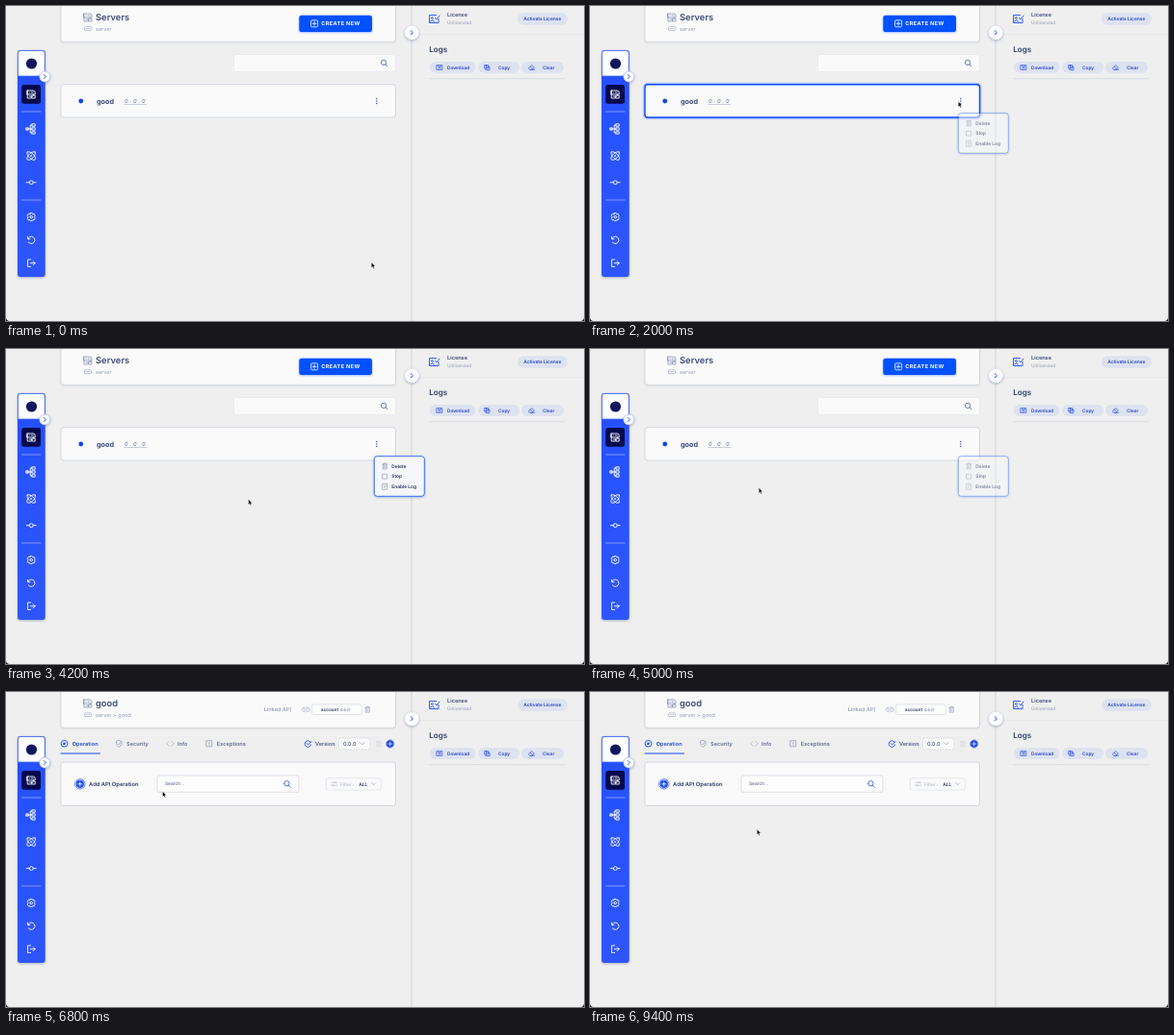
An HTML page for the animation above (9.8 s loop, 600 by 328 pixels).

```html
<!DOCTYPE html>
<html lang="en">
<head>
<meta charset="utf-8">
<title>Servers</title>
<style>
html, body { margin: 0; width: 100%; height: 100%; overflow: hidden; background: #efefef; }
svg { display: block; width: 600px; height: 328px; }
text { font-family: Inter, sans-serif; font-weight: 600; text-rendering: geometricPrecision; white-space: pre; }
.line { fill: none; stroke-linecap: round; stroke-linejoin: round; }
</style>
</head>
<body>
<svg id="stage" viewBox="0 0 600 328" xmlns="http://www.w3.org/2000/svg">
  <defs>
    <filter id="soft" x="-30%" y="-30%" width="160%" height="180%">
      <feDropShadow dx="0" dy="1" stdDeviation="1.2" flood-color="#30437c" flood-opacity=".4"/>
    </filter>
    <filter id="glow" x="-20%" y="-20%" width="140%" height="150%">
      <feDropShadow dx="0" dy=".6" stdDeviation="1.3" flood-color="#2b5cff" flood-opacity=".5"/>
    </filter>
    <linearGradient id="side" x2="0" y2="1">
      <stop stop-color="#2450ff"/><stop offset="1" stop-color="#2f55fa"/>
    </linearGradient>
  </defs>
</svg>
<script>
const LOOP = 9800, STEP = 100;
const BLUE = '#0a4dff', INK = '#3f4b78', MUTED = '#9299b5', PALE = '#b3b9cc', EDGE = '#d0d4dd', CARD = '#fafafa';
const stage = document.getElementById('stage');

const rect = (x, y, w, h, r, fill, stroke = 'none', sw = .8, more = '') =>
  `<rect x="${x}" y="${y}" width="${w}" height="${h}" rx="${r}" fill="${fill}" stroke="${stroke}" stroke-width="${sw}" ${more}/>`;
const circle = (x, y, r, fill, stroke = 'none', sw = .8, more = '') =>
  `<circle cx="${x}" cy="${y}" r="${r}" fill="${fill}" stroke="${stroke}" stroke-width="${sw}" ${more}/>`;
const path = (d, color, sw = .8, x = 0, y = 0) =>
  `<path class="line" d="${d}" stroke="${color}" stroke-width="${sw}" transform="translate(${x} ${y})"/>`;
const text = (s, x, y, size, fill, weight = 600, more = '') =>
  `<text x="${x}" y="${y}" font-size="${size}" fill="${fill}" style="font-weight:${weight}" ${more}>${s}</text>`;

// Icons are drawn around their own centre.
const ICON = {
  server: 'M-4-4H2Q4-4 4-2V0H-4ZM-4 0V4H0M-4-4V0M-2-2H-1.8M0-2H2M-2 2H-.5M1 1H4V4H1ZM2.5 0V1M0 2.5H1',
  tree: 'M-5 0H1M-1 0V-4H1M-1 0V4H1M1-5.2H4V-2.8H1ZM1-1.2H4V1.2H1ZM1 2.8H4V5.2H1ZM-5-1.2H-3V1.2H-5Z',
  atom: 'M-4-4C-1-6 6 1 4 4C1 6-6-1-4-4ZM4-4C1-6-6 1-4 4C-1 6 6-1 4-4ZM-.5 0A.5.5 0 1 0 .5 0A.5.5 0 1 0-.5 0',
  commit: 'M-5 0H-2M2 0H5M-2 0A2 2 0 1 0 2 0A2 2 0 1 0-2 0',
  gear: 'M-1-4H1L1.5-2.9L3-3.2L4-1.5L3.3 0L4 1.5L3 3.2L1.5 2.9L1 4H-1L-1.5 2.9L-3 3.2L-4 1.5L-3.3 0L-4-1.5L-3-3.2L-1.5-2.9ZM-1.3 0A1.3 1.3 0 1 0 1.3 0A1.3 1.3 0 1 0-1.3 0',
  undo: 'M-3.7-3.5V-1H-1.2M-3.5-1.2A3.7 3.7 0 1 1-3 2.2',
  exit: 'M-.5-3.7H-3.7V3.7H-.5M-1 0H4M2-2L4 0L2 2',
  link: 'M-.7-2H-1.8A2 2 0 0 0-1.8 2H-.7M.7-2H1.8A2 2 0 0 1 1.8 2H.7M-1.7 0H1.7',
  find: 'M-3.3-.6A2.7 2.7 0 1 0 2.1-.6A2.7 2.7 0 1 0-3.3-.6M1.4 1.4L3.4 3.4',
  trash: 'M-2.5-2H2.5M-1-2V-3H1V-2M-2-2V3H2V-2M-.7-.5V1.7M.7-.5V1.7',
  stop: 'M-2.4-2.4H2.4V2.4H-2.4Z',
  log: 'M-2.3-3H2.3V3H-2.3ZM-1-1H1M-1 .7H.5',
  plus: 'M-2 0H2M0-2V2',
  down: 'M-1.8-.9L0 .9L1.8-.9',
  next: 'M-1-2L1 0L-1 2',
  shield: 'M0-3.4L2.8-2.3V0Q2.5 2.3 0 3.5Q-2.5 2.3-2.8 0V-2.3ZM-1.2 0L-.2 1L1.4-1',
  code: 'M-1.5-2.4L-3.8 0L-1.5 2.4M1.5-2.4L3.8 0L1.5 2.4',
  warn: 'M-2.8-3H2.8V3H-2.8ZM0-1.4V.5M0 1.6V1.7',
  check: 'M2.8-1.7A3.3 3.3 0 1 0 3.2.8M-1.3-.4L0 1L3.5-2.5',
  slide: 'M-3-1.5H0M2-1.5H3M0-1.5A1 1 0 1 0 2-1.5A1 1 0 1 0 0-1.5M-3 1.5H-2M0 1.5H3M-2 1.5A1 1 0 1 0 0 1.5A1 1 0 1 0-2 1.5',
  save: 'M-2.8-2.3H2.8V2.3H-2.8ZM-1.2-2.3V-.5H1.2V-2.3M-1.2 1H1.2',
  copy: 'M-2.5-2.5H1.2V1H-2.5ZM-1-2.5V-.8H2.5V2.6H-1Z',
  erase: 'M-3 .7L.3-2.4L3 .2L.7 2.3H-1.4ZM-1.3-.9L1.5 1.7M-1 2.3H3',
  badge: 'M2-4H-5V4H4.5V0M-3-1A1 1 0 1 0-1-1A1 1 0 1 0-3-1M-4 2.5Q-2 0 0 2.5M1-1L2.5.5L5.5-3.5'
};
const icon = (name, x, y, color, sw = .7) => path(ICON[name], color, sw, x, y);
const box = (y, h) => rect(57, y, 347.5, h, 3, CARD, EDGE, .9);

function header(title, trail) {
  return rect(57, -6, 347.5, 43.3, 3, CARD, EDGE, .9, 'filter="drop-shadow(0 1px 1px #0001)"') +
    icon('server', 85, 12, '#7f89ab', .7) + text(title, 93, 15.3, 9.4, INK, 600) +
    icon('link', 85, 23.7, MUTED, .6) + text(trail, 93, 25.8, 5.5, MUTED, 400);
}

function sidebar() {
  const items = { tree: 128, atom: 156, commit: 183.7, gear: 219.7, undo: 243.7, exit: 267.7 };
  return rect(12, 46, 28.7, 236, 3, 'url(#side)', 'none', 0, 'filter="url(#soft)"') +
    `<path d="M12.4 73V49Q12.4 46.4 15 46.4H37.7Q40.3 46.4 40.3 49V73Z" fill="#fdfdff" stroke="#3e66ff" stroke-width=".8"/>` +
    circle(26.5, 60, 5.6, '#10165e') +
    rect(16.2, 82, 19.8, 19.8, 2.5, '#04094c') + icon('server', 26.2, 92, '#fff', .9) +
    path('M16.5 110H36M16.5 202H36', '#a9bbff', .7) +
    Object.entries(items).map(([n, y]) => icon(n, 26.2, y, '#fff', .9)).join('') +
    circle(40.3, 73.5, 5.5, '#fdfdff', '#9fb4f2', .6, 'filter="url(#soft)"') + icon('next', 40.3, 73.5, BLUE, .9);
}

function panel() {
  const pill = (x, y, w, h) => rect(x, y, w, h, h / 2, '#dde2f0');
  const button = (label, name, x, w, ix, tx) =>
    pill(x, 58, w, 12) + icon(name, ix, 64, '#2148e0', .65) + text(label, tx, 65.7, 4.8, '#2545c5');
  return path('M421 0V328', '#cbced6', .9) + path('M429 29.7H600', '#dfe1e6', .6) +
    icon('badge', 444.5, 13.5, '#1c4dff', .9) + text('License', 458, 11.4, 5.6, INK) +
    text('Unlicensed', 458, 18.8, 4.75, MUTED, 400) +
    pill(531, 7.2, 52, 12.6) + text('Activate License', 537.3, 15.3, 4.9, '#2545c5') +
    text('Logs', 439.3, 48, 8.1, '#343f6b') +
    button('Download', 'save', 440, 47.5, 450, 458) +
    button('Copy', 'copy', 490, 43, 499.5, 511) +
    button('Clear', 'erase', 535, 44, 545.5, 557) +
    path('M439.5 75.7H580', '#cfd3dc', .7) +
    circle(421.3, 27.7, 7.4, '#fdfdff', '#d5daea', .5, 'filter="url(#soft)"') + icon('next', 421.3, 27.7, BLUE, 1);
}

function listPage() {
  return header('Servers', 'server') +
    rect(304.3, 9.7, 75.7, 17.4, 2.5, '#0651ff', 'none', 0, 'filter="url(#glow)"') +
    rect(316.6, 14.8, 7, 7, 1.2, 'none', '#fff', .8) + icon('plus', 320.1, 18.3, '#fff', .8) +
    text('CREATE NEW', 327.3, 20.3, 5.6, '#fff', 700, 'letter-spacing=".35"') +
    rect(236.4, 50.5, 168, 18, 2.5, CARD, '#e5e7ec', .7) + icon('find', 392.7, 59.5, '#5a6da8', .9) +
    box(81.7, 34.3) +
    `<g id="ring">${rect(56.5, 81.2, 348.5, 35.3, 3.5, 'none', '#b5c8ff', 3.4)}${rect(57, 81.7, 347.5, 34.3, 3, CARD, '#0d48ee', 1.4)}</g>` +
    circle(77.8, 99, 2.4, '#1145ea') + text('good', 94, 101.5, 7.3, INK, 700) +
    text('0 . 0 . 0', 123, 101.2, 5.7, '#7780a0', 500, 'font-style="italic" letter-spacing=".15"') +
    path('M122.7 102.5H145.7', '#98a0ba', .5) +
    [96.4, 99, 101.6].map(y => circle(384.8, y, .75, '#3450b4')).join('');
}

function detailPage() {
  return header('good', 'server &gt; good') +
    text('Linked API', 267.7, 20.2, 5.6, MUTED, 500) + icon('link', 311.3, 18.2, MUTED, .6) +
    rect(317.6, 13, 51.7, 10.6, 2, '#fdfdfd', '#d5d8e2', .7) +
    text('account', 327, 19.8, 4.6, '#28345f') + text('0.0.0', 347, 19.8, 4, '#59658a', 500, 'font-style="italic"') +
    icon('trash', 375.3, 18.2, MUTED, .6) +
    circle(60.5, 53.8, 3.4, 'none', '#174cff', .9) + circle(60.5, 53.8, 1.3, '#174cff') +
    text('Operation', 68.7, 55.8, 5.65, '#2147cf', 600) + path('M57 64H97.5', '#1d4ff5', 1.1) +
    icon('shield', 117.3, 53.8, '#8b94b0') + text('Security', 125, 55.8, 5.65, '#616c90') +
    icon('code', 170.5, 53.8, '#a2a9bf') + text('Info', 178, 55.8, 5.65, '#616c90') +
    icon('warn', 211, 53.8, '#8b94b0') + text('Exceptions', 218.8, 55.8, 5.65, '#616c90') +
    icon('check', 313.5, 54, '#1f4ee8', .9) + text('Version', 321, 56, 5.6, '#4d5a86') +
    rect(345.3, 48, 32.7, 12, 2, CARD, '#d9dce4', .7) + text('0.0.0', 350, 56, 5.6, '#4d5a86', 500) +
    icon('down', 370, 54, MUTED, .7) + icon('trash', 387, 54, '#d2d5dd', .6) +
    circle(398.7, 54, 4.2, '#1d45dc', '#a7b8f3', .9) + icon('plus', 398.7, 54, '#fff', .7) +
    box(73, 45.5) +
    circle(76.8, 95.8, 5.2, '#fff', '#2a55f3', .8) + circle(76.8, 95.8, 4.1, '#1c4af0') + icon('plus', 76.8, 95.8, '#fff', .9) +
    text('Add API Operation', 86, 97.8, 5.8, '#2f3b68') +
    rect(157, 87, 147, 17.3, 2, '#fdfdfd', '#d3d7e2', .8) + text('Search...', 165, 97.4, 4.8, '#5d678b', 500) +
    icon('find', 292, 95.8, '#4263d4', .9) +
    rect(332.3, 89.7, 57.3, 12.3, 2, CARD, '#dcdfe7', .7) + icon('slide', 340.5, 95.8, PALE, .6) +
    text('Filter :', 347, 97.6, 4.8, PALE, 500) + text('ALL', 366.2, 97.6, 4.9, '#2f3b68') + icon('down', 381.5, 95.8, MUTED, .7);
}

function menu() {
  const row = (label, name, y, color = '#252f58', tint = '#8d94aa') =>
    icon(name, 393.3, y, tint, .65) + text(label, 400.3, y + 1.7, 4.85, color);
  return rect(382.3, 111.7, 52, 41.6, 3, '#f6f7fa', '#3567ee', .9, 'filter="url(#glow)"') +
    row('Delete', 'trash', 122) + row('Enable Log', 'log', 143.3) +
    `<g id="stopOff">${row('Stop', 'stop', 132.7)}</g>` +
    `<g id="stopOn">${row('Stop', 'stop', 132.7, BLUE, BLUE)}${path('M400.3 135.5H411.3', BLUE, .5)}</g>`;
}

const tip = rect(4.7, -.5, 73.3, 13.8, 2.5, '#fbfcff', '#2f62e8', .8) +
  text('HTTP Server on port 8080', 11, 8.1, 4.8, '#2149c4');
const arrow = `<path d="M0 0V5.6L1.3 4.5L2.2 6.4L3.1 6L2.3 4.1H4Z" fill="#050505" stroke="#fff" stroke-width=".4"/>`;
const hand = `<path d="M-.6-.2Q.2-1 .9 0L1.5 2L4 2.7Q5 3.1 4.7 4.3L4.2 6.2H1L-1 4Q-1.3 3.1 .1 3.2Z" fill="#fff" stroke="#111" stroke-width=".7" stroke-linejoin="round"/>`;

const group = (id, body) => `<g id="${id}">${body}</g>`;
stage.insertAdjacentHTML('beforeend',
  rect(0, 0, 600, 328, 0, '#efefef') + group('list', listPage()) + group('detail', detailPage()) +
  sidebar() + panel() + group('menu', menu()) + group('tip', tip) +
  '<path d="M0 324.5Q.3 327.7 3.5 328H0ZM600 324.5Q599.7 327.7 596.5 328H600Z" fill="#111"/>' +
  group('cursor', group('arrow', arrow) + group('hand', hand)));

const el = {};
for (const id of ['list', 'detail', 'ring', 'menu', 'stopOff', 'stopOn', 'tip', 'cursor', 'arrow', 'hand'])
  el[id] = document.getElementById(id);
const show = (id, on) => { el[id].style.display = on ? '' : 'none'; };

// Pointer stops: time, x, y
const stops = [
  [0, 379.3, 267], [100, 379.3, 267], [400, 381, 240], [700, 381, 240], [1000, 379.5, 112.5],
  [1600, 382.3, 99.5], [2000, 382.3, 99.5], [2800, 398, 124], [3100, 401.5, 132.5], [3500, 401.5, 132.5],
  [4400, 230, 160], [4500, 230, 160], [4800, 175.3, 144.5], [5900, 175.3, 144.5], [6300, 162.5, 103.5],
  [7400, 162.5, 103.5], [8300, 168, 149], [8400, 168, 149], [9400, 173.3, 143], [LOOP, 173.3, 143]
];

function pointer(t) {
  const i = Math.max(1, stops.findIndex(s => s[0] >= t));
  const [a, b] = [stops[i - 1], stops[i]];
  const k = (t - a[0]) / (b[0] - a[0]), e = k * k * (3 - 2 * k);
  return [a[1] + (b[1] - a[1]) * e, a[2] + (b[2] - a[2]) * e];
}

function draw(time) {
  const t = Math.floor((time % LOOP) / STEP) * STEP;
  const [x, y] = pointer(t);
  const listed = t < 6500;
  const open = t >= 2000 && t <= 5000;
  const over = listed && x > 57 && x < 404 && y > 81 && y < 116;
  const hover = over && (!open || t < 2100);
  const onStop = open && x > 388 && x < 430 && y > 128 && y < 138;
  const onItem = open && t > 2100 && x > 388 && x < 430 && y > 117 && y < 148;
  show('list', listed);
  show('detail', !listed);
  show('ring', hover);
  show('menu', open);
  el.menu.style.opacity = t === 2000 || t === 5000 ? .55 : 1;
  show('stopOn', onStop);
  show('stopOff', !onStop);
  show('tip', hover && !open);
  el.tip.setAttribute('transform', `translate(${x} ${y - .5})`);
  el.cursor.setAttribute('transform', `translate(${x} ${y})`);
  const pointing = (hover && !open) || onItem;
  show('hand', pointing);
  show('arrow', !pointing);
}

const start = performance.now();
function tick() {
  draw(performance.now() - start);
  requestAnimationFrame(tick);
}
tick();
</script>
</body>
</html>
```
